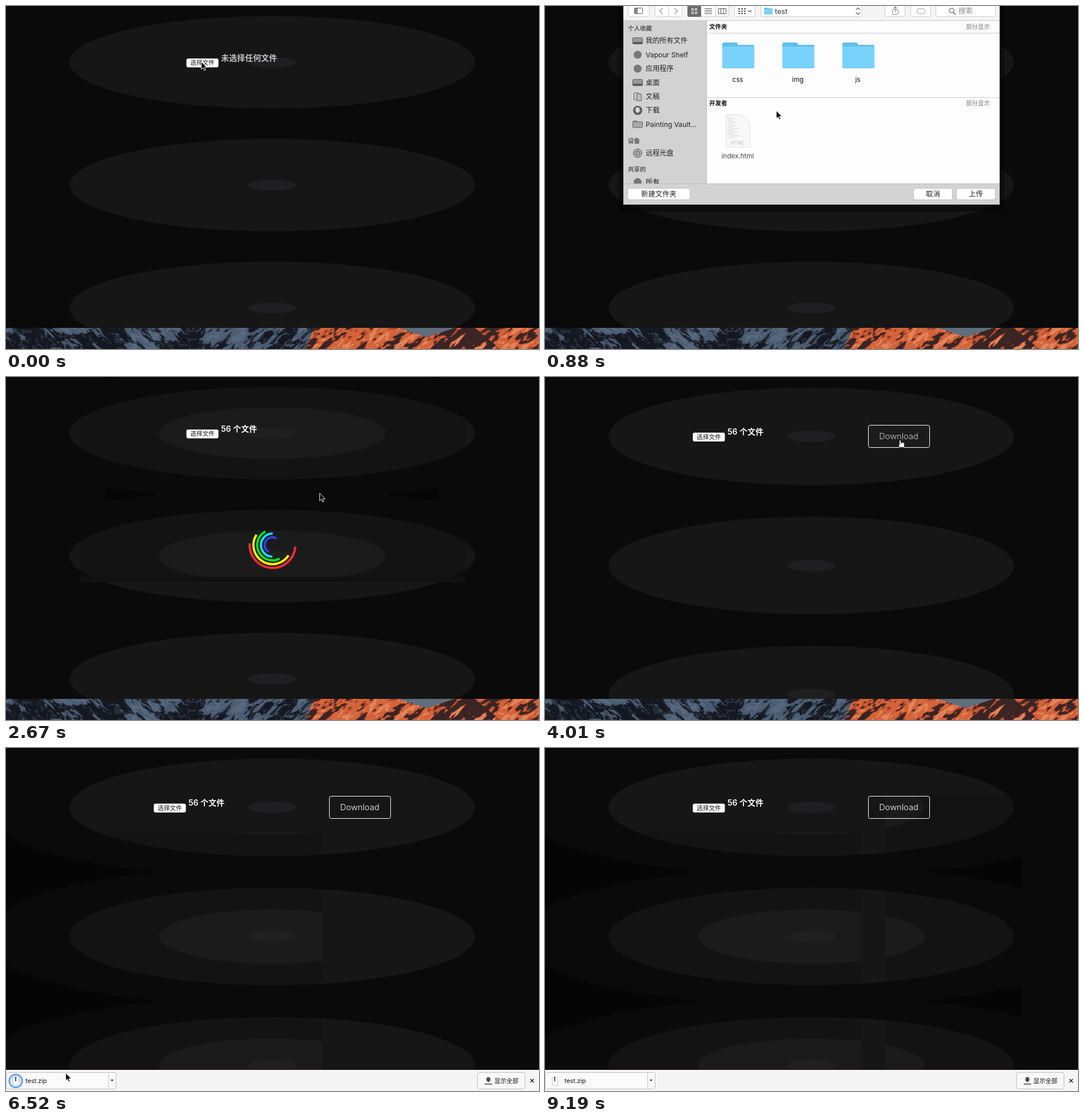
Write an HTML page with a canvas that moves like this. It is 932x601 px and loops after 9.29 s.

```html
<!DOCTYPE html>
<html lang="zh">
<head>
<meta charset="utf-8">
<style>
html, body { margin: 0; width: 100%; height: 100%; overflow: hidden; background: #0a0a0a; }
canvas { display: block; }
</style>
</head>
<body>
<canvas id="stage" width="932" height="601"></canvas>
<script>
const g = document.getElementById('stage').getContext('2d', { willReadFrequently: true });
const LOOP = 9290, BEAT = 148.25, TAU = Math.PI * 2;

const ramp = (n, from, to) => Math.min(1, Math.max(0, (n - from) / (to - from)));
const ease = (n, from, to) => { const u = ramp(n, from, to); return u * u * (3 - 2 * u); };

function paint(fill, stroke, width = 1) {
  if (fill) { g.fillStyle = fill; g.fill(); }
  if (stroke) { g.strokeStyle = stroke; g.lineWidth = width; g.stroke(); }
}
function rect(x, y, w, h, fill) { g.fillStyle = fill; g.fillRect(x, y, w, h); }
function box(x, y, w, h, r, fill, stroke) { g.beginPath(); g.roundRect(x, y, w, h, r); paint(fill, stroke); }
function disc(x, y, r, fill, stroke, width) { g.beginPath(); g.arc(x, y, r, 0, TAU); paint(fill, stroke, width); }
function poly(points, fill, stroke, width) {
  g.beginPath();
  for (let i = 0; i < points.length; i += 2) g.lineTo(points[i], points[i + 1]);
  if (fill) g.closePath();
  paint(fill, stroke, width);
}
function clipped(x, y, w, h, body) {
  g.save();
  g.beginPath(); g.rect(x, y, w, h); g.clip();
  body();
  g.restore();
}
function text(s, x, y, size, color, weight = 400, align = 'left') {
  g.font = `${weight} ${size}px Inter, "Noto Sans CJK SC", "Noto Sans CJK", sans-serif`;
  g.textAlign = align; g.fillStyle = color;
  g.fillText(s, x, y + size * .36);
}
function downArrow(x, top, h, fill, stroke) {
  const stem = h * .32, head = h * .52, neck = top + h * .43;
  poly([x - stem, top, x + stem, top, x + stem, neck, x + head, neck, x, top + h, x - head, neck, x - stem, neck], fill, stroke, 2);
}
function chevron(x, y, r, quarterTurns, color = '#666') {
  g.save();
  g.translate(x, y); g.rotate(quarterTurns * TAU / 4);
  poly([-r, -r / 2, 0, r / 2, r, -r / 2], null, color, 1.3);
  g.restore();
}

// Tiled radial gradient, seen as flat bands: [radius, colour]
const COARSE = [[354.5, '#161616'], [42, '#1f1f21']];
const FINE = [[510, '#0a0a0a'], [354.5, '#131313'], [198, '#1b1b1b'], [42, '#202020']];

function rings(late, levels, back, x, y, w, h) {
  const top = late ? 104 : 98.5, period = late ? 226.3 : 215.3, flat = late ? .241 : .2287;
  clipped(x, y, w, h, () => {
    rect(x, y, w, h, back);
    for (let i = 0; i < 3; i++)
      for (const [r, color] of levels) {
        g.beginPath(); g.ellipse(465.5, top + i * period, r, r * flat, 0, 0, TAU); paint(color);
      }
  });
}

function backdrop(n) {
  const late = n >= 20;
  rings(late, COARSE, '#0a0a0a', 0, 0, 932, 564);
  if (!late && n >= 12) {
    rings(false, FINE, '#0a0a0a', 129, 0, 674, 350);
    if (n >= 14) rings(false, FINE, '#050505', 174, 0, 582, 217);
    rect(129, 350, 674, 10, '#111');
  }
  if (n >= 35) rings(true, FINE, '#050505', 0, 148, 553, 416);
  if (n >= 62) rings(true, FINE, '#050505', 595, 84, 239, 480);
}

// Smooth value noise
function noise(x, y) {
  const hash = (i, j) => { const s = Math.sin(i * 127.1 + j * 311.7) * 43758.5453; return s - Math.floor(s); };
  const i = Math.floor(x), j = Math.floor(y), u = ease(x, i, i + 1), v = ease(y, j, j + 1);
  const row = k => hash(i, k) * (1 - u) + hash(i + 1, k) * u;
  return row(j) * (1 - v) + row(j + 1) * v;
}

function rockColor(x, y) {
  const u = x + (x < 320 ? -y : y) * .9;
  const fine = noise(u / 4, y / 5), n = noise(u / 13, y / 15) * .6 + fine * .4;
  if (x < 538 - y * .4) {
    const edge = .5 - .16 * Math.sin(x / 23) + (x > 340 ? -.02 : .06 - y * .004);
    return n > edge ? (fine > .75 ? '#272e3a' : '#151821') : n > edge - .07 ? '#3a4759' : fine > .4 ? '#56687e' : '#4a5b70';
  }
  if (Math.abs(x - 735) < 48 - y * 3) return '#5f6e7d';
  const shade = Math.abs(x - 808) < 12 + y * 1.2 ? .22 : 0;
  return n + shade > .6 ? '#3a2524' : n + shade > .52 ? '#a8482c' : n > .32 ? '#d4633a' : '#e1855c';
}

const wallpaper = (() => {
  for (let y = 0; y < 37; y++)
    for (let x = 0; x < 932; x++) rect(x, 564 + y, 1, 1, rockColor(x, y));
  return g.getImageData(0, 564, 932, 37);
})();

function folder(x, y, s) {
  box(x, y, 27 * s, 12 * s, 3 * s, '#5fbfec');
  box(x, y + 4 * s, 56 * s, 41 * s, 2 * s, '#5fbfec');
  box(x, y + 7 * s, 56 * s, 37 * s, 2 * s, '#79d2fb');
}

function sideIcon(kind, y) {
  const c = '#5c5c5c';
  if (kind === 'dot') disc(162, y, 7, '#777');
  if (kind === 'sheet') { box(155.5, y - 6.5, 8, 12, 1, '#ccc', c); box(160.5, y - 4.5, 8, 12, 1, '#bbb', c); }
  if (kind === 'down') { disc(162, y, 8, c); downArrow(162, y - 5, 10, '#ddd'); }
  if (kind === 'disc') { disc(162, y, 7.5, '#aaa', c); disc(162, y, 3.5, null, c); }
  if (kind === 'screen') { box(153.5, y - 5.5, 17, 11, 1, '#999', c); rect(154, y + 2, 16, 3, c); }
  if (kind === 'folder') { box(154, y - 6, 7, 4, 1, null, c); box(153.5, y - 4.5, 17, 10, 1, '#aaa', c); }
}

const SIDEBAR = [
  ['个人收藏', ['我的所有文件', 'screen'], ['Vapour Shelf', 'dot'], ['应用程序', 'dot'], ['桌面', 'screen'],
    ['文稿', 'sheet'], ['下载', 'down'], ['Painting Vault...', 'folder']],
  ['设备', ['远程光盘', 'disc']],
  ['共享的', ['所有', 'dot']]];

function sidebar() {
  rect(137, 26, 146, 285, '#d2d2d2');
  rect(282, 26, 1, 285, '#bbb');
  let y = 39;
  for (const [title, ...items] of SIDEBAR) {
    text(title, 145, y, 10.5, '#555', 600);
    items.forEach(([label, kind], i) => {
      sideIcon(kind, y + 22 + i * 24.4);
      text(label, 176, y + 22 + i * 24.4, 12.2, '#222');
    });
    y += 26.2 + items.length * 24.4;
  }
}

function toolbar() {
  const c = '#555', button = (x, w) => box(x + .5, -4.5, w - 1, 23, 3, '#fff', '#cdcdcd');
  rect(137, -90, 658, 116, '#f5f5f5');
  rect(137, 25, 658, 1, '#c9c9c9');
  button(145, 38); box(156.5, 3.5, 14, 10, 1, null, c); rect(157, 4, 5, 9, '#888');
  button(192, 48); rect(216, -4, 1, 23, '#ccc');
  chevron(203, 9, 5, 1, '#999'); chevron(229, 9, 5, -1, '#999');
  button(249, 73); box(249, -5, 24, 24, [3, 0, 0, 3], '#6c6c6c'); rect(298, -4, 1, 23, '#ccc');
  for (let i = 0; i < 4; i++) {
    box(256.5 + i % 2 * 6, 4.5 + (i >> 1) * 6, 3, 3, 0, null, '#fff');
    rect(279, 4 + i * 3, 13, 1, c);
  }
  box(303.5, 4.5, 13, 9, 0, null, c); box(307.5, 4.5, 5, 9, 0, null, c);
  button(331, 37); chevron(358, 9, 3, 0);
  for (let i = 0; i < 9; i++) rect(338 + i % 3 * 5, 4 + Math.floor(i / 3) * 4, 3, 2, c);
  button(377, 178); folder(383, 3, .26); text('test', 402, 9, 12.6, '#333');
  chevron(547.5, 5, 3.5, 2); chevron(547.5, 13, 3.5, 0);
  button(594, 36); box(607.5, 6.5, 10, 8, 1, null, '#888'); rect(612, 1, 1, 10, '#888'); chevron(612.5, 3, 3, 2, '#888');
  button(639, 36); box(650.5, 4.5, 14, 9, 4, null, '#999');
  button(683, 105); disc(711, 8, 4, null, c, 1.2); poly([714, 11, 718, 15], null, c, 1.4);
  text('搜索', 723, 9, 12.4, '#8a8a8a');
}

function fileGrid() {
  rect(283, 26, 512, 285, '#fdfdfd');
  rect(283, 47, 512, 1, '#cfcfcf');
  rect(283, 160, 512, 1, '#cfcfcf');
  ['文件夹', '开发者'].forEach((title, i) => {
    text(title, 287, 36.5 + i * 134, 10.5, '#111', 700);
    text('部分显示', 778, 36.5 + i * 134, 10.5, '#777', 400, 'right');
  });
  ['css', 'img', 'js'].forEach((name, i) => {
    folder(310 + i * 105, 64, 1);
    text(name, 337 + i * 105, 129, 11.8, '#111', 400, 'center');
  });
  box(316.5, 190.5, 42, 57, [0, 22, 0, 0], '#f8f8f8', '#e0e0e0');
  for (let i = 0; i < 13; i++) rect(318 + i * 5 % 4, 194 + i * 3, 7 + i * 7 % 13, 1, '#d4d4d4');
  text('HTML', 337, 240, 8.5, '#bbb', 400, 'center');
  text('index.html', 337, 263, 11.6, '#444', 400, 'center');
}

function sheet(n) {
  const bottom = Math.round(348 * (ease(n, 2, 5) - ease(n, 11, 14.54)));
  if (bottom <= 0) return;
  const button = (label, x, w, fill = '#fff') => {
    box(x - .5, 319.5, w + 1, 20, 4, fill, '#c2c2c2');
    text(label, x + w / 2, 329.5, 12.4, '#222', 400, 'center');
  };
  g.save();
  g.translate(0, bottom - 348);
  rect(129, -90, 674, 450, '#0006');
  sidebar();
  toolbar();
  fileGrid();
  rect(137, 311, 658, 37, '#d3d3d3');
  rect(137, 311, 658, 1, '#bcbcbc');
  button('新建文件夹', 145, 108);
  button('取消', 645, 67);
  button('上传', 720, 67, n >= 10 ? '#dadada' : '#fff');
  g.restore();
}

function form(n) {
  const late = n >= 20, chosen = n >= 14, hover = n >= 27 && n < 34;
  g.save();
  if (late) g.translate(-57, 5.5);
  box(315.5, 92, 56, 15.5, 3, n === 1 || n === 2 ? '#d4d4d4' : '#fff');
  text('选择文件', 343.5, 99.5, 10.6, '#111', 400, 'center');
  text(chosen ? '56 个文件' : '未选择任何文件', 376, 90.5, 14, chosen ? '#fff' : '#c2c2c2', 600);
  g.restore();
  if (!late) return;
  box(565.5, 84.5, 107, 39, 3, hover ? '#1b1b1b' : null, '#fff');
  text('Download', 618.5, 104, 14.6, hover ? '#cfcfcf' : '#fff', 300, 'center');
}

function spinner(n) {
  if (n < 15 || n >= 20) return;
  ['#ff2b36', '#f4ee0a', '#0fe21a', '#08e2f0', '#4036ee'].forEach((color, i) => {
    const a = (4 + 29 * i + (n - 18) * 18 * (i + 1)) * TAU / 360;
    g.beginPath(); g.arc(466, 294.5, 40 - i * 6.6, a, a + Math.PI);
    paint(null, color, 4);
  });
}

function downloadBadge(n) {
  const u = ramp(n, 30, 34);
  g.save();
  g.globalAlpha = Math.min(u, 1 - u) * 2;
  g.translate(0, 105 * (u - .5));
  const fill = g.createLinearGradient(0, 406, 0, 511);
  fill.addColorStop(0, '#293d66'); fill.addColorStop(1, '#161f42');
  box(1.5, 406.5, 109, 104, 8, fill, '#26355a');
  g.lineJoin = 'round';
  downArrow(56, 424, 69, '#76777a', '#85868a');
  g.restore();
}

function downloadItem(n) {
  const done = n >= 35;
  box(.5, 568.5, 192, 29, 3, '#fafafa', '#bdbdbd');
  rect(179, 569, 1, 28, '#c4c4c4');
  poly([183, 581, 188, 581, 185.5, 584], '#222');
  g.globalAlpha = n < 33 ? 1 : n > 48 ? 0 : .5 - .5 * Math.cos(TAU * (n - 32) / 8);
  disc(17, 583.5, 11.5, '#d3e4fa', '#418ef0', 2);
  g.globalAlpha = 1;
  box(12.5, 576.5, 10, 14, [0, 3, 0, 0], '#fff', '#ccc');
  rect(16, 576, 2, 8, '#555');
  text('test.zip', 34, done ? 583 : 578, 10.8, '#111');
  if (!done) text('119/119 KB', 35, 591, 10.6, '#666');
}

function shelf(n) {
  if (n < 30) return g.putImageData(wallpaper, 0, 564);
  rect(0, 564, 932, 37, '#f5f5f5');
  rect(0, 563, 932, 1, '#1c0d14');
  clipped(0, 564, Math.min(193, 147 + 46 * (n - 32)), 37, () => downloadItem(n));
  box(824.5, 568.5, 83, 29, 3, '#f8f8f8', '#bdbdbd');
  downArrow(843.5, 577, 9, '#444');
  rect(837, 588, 13, 1.5, '#444');
  text('显示全部', 854, 583, 10.5, '#111', 500);
  for (const d of [-3, 3]) poly([920 - d, 580, 920 + d, 586], null, '#222', 1.5);
}

function statusBubble(n) {
  if (n < 28 || n >= 35) return;
  box(0, 547, 309.5, 16, [0, 3, 0, 0], '#f1f1f1');
  text('localhost:8088/download', 0, 555, 10.6, '#222');
}

// Pointer moves: first beat, last beat, destination
const MOVES = [
  [3, 6, 404, 184], [6, 9, 745, 325], [11, 13, 601, 221], [13, 15, 548, 204], [25, 27, 617, 110],
  [33, 40, 282, 447], [41, 44, 104, 570], [47, 48, 190, 572], [50, 51, 912, 580], [52, 56, 315, 543], [56, 58, 92, 602]];

function pointer(n) {
  let x = 341, y = 98;
  for (const [from, to, tx, ty] of MOVES) {
    const u = ramp(n, from, to);
    x += (tx - x) * u;
    y += (ty - y) * u;
  }
  if (y > 601) return;
  g.save();
  g.translate(Math.round(x), Math.round(y) - 1);
  if (n >= 27 && n < 34) {
    box(1.5, 5.5, 10, 9, 3, '#fff', '#111');
    box(2.5, 1.5, 3, 9, 1.5, '#fff', '#111');
    rect(3, 8, 8, 5, '#fff');
  } else poly([.5, .5, .5, 14, 3.5, 11.2, 5.8, 16, 8, 15, 5.8, 10.5, 10, 10.5], '#0a0a0a', '#e4e4e4', 1);
  g.restore();
}

function draw(clock) {
  const n = Math.floor((clock % LOOP + 10) / BEAT);
  for (const layer of [backdrop, form, spinner, sheet, downloadBadge, statusBubble, shelf, pointer]) layer(n);
}

const begin = performance.now();
(function tick() {
  draw(performance.now() - begin);
  requestAnimationFrame(tick);
})();
</script>
</body>
</html>
```
